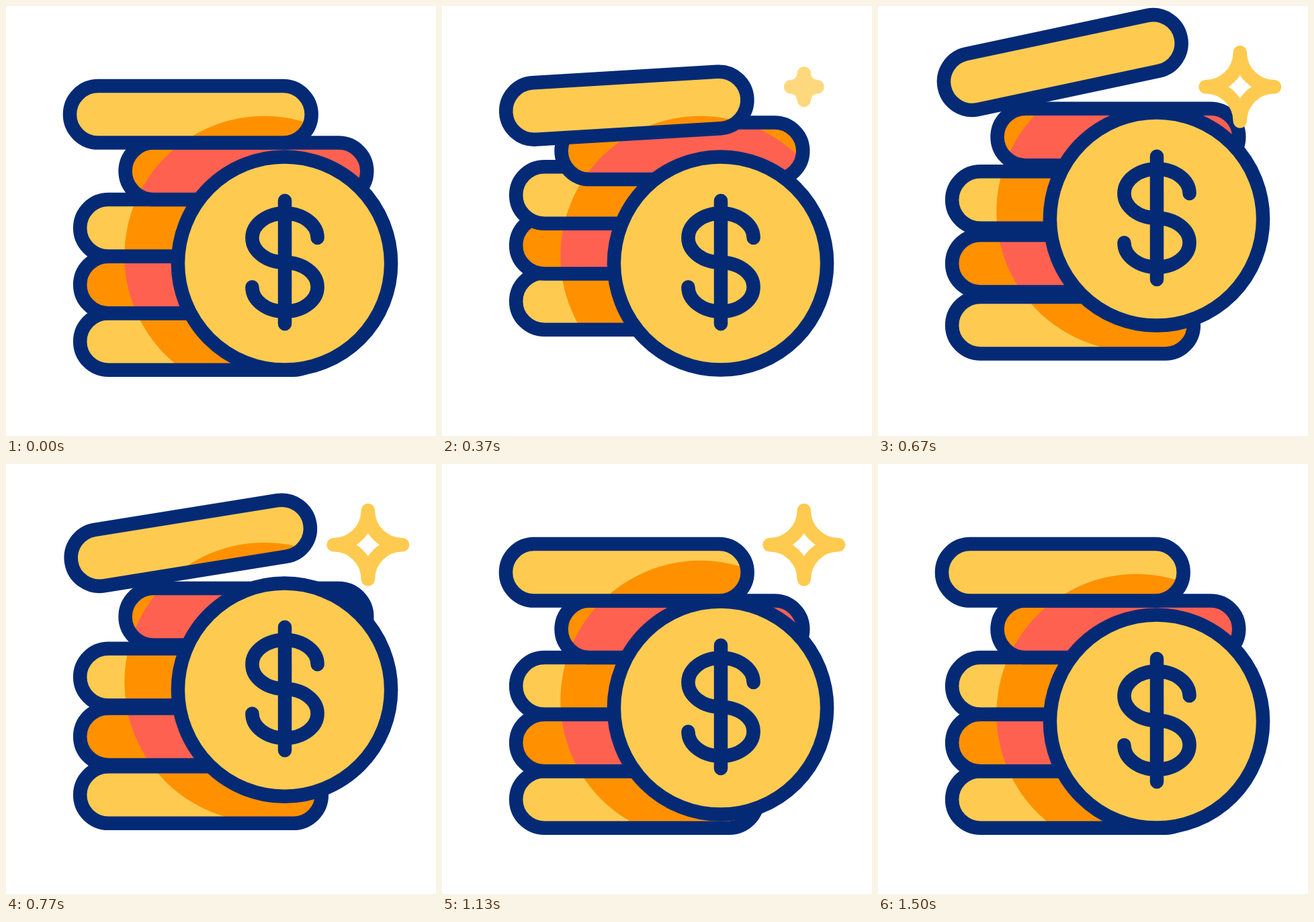
These frames come from a looping animation (640 px wide and 640 px high, 2 s). An HTML page with a canvas:

```html
<!DOCTYPE html>
<html lang="en">
<head>
<meta charset="utf-8">
<title>Coins</title>
<style>
  html, body { margin: 0; width: 100%; height: 100%; overflow: hidden; background: #fff; }
  canvas { display: block; width: 100vmin; height: 100vmin; }
</style>
</head>
<body>
<canvas width="640" height="640"></canvas>
<script>
const ctx = document.querySelector('canvas').getContext('2d');
const LOOP = 2000, STEP = 1000 / 30, LINE = 20.5;
const NAVY = '#042a76', YELLOW = '#fecb50', ORANGE = '#ff9100', RED = '#ff6151';
const BAR_RADIUS = 42.25, BAR_HALF = 137.6;

// Key times are in steps of 1/30 s.
const BARS = [
  { x: 290, y: 499.4, fill: YELLOW, shade: ORANGE, rise: [[0, 0], [10, 60], [12, 60], [26.4, 0]] },
  { x: 290, y: 414.9, fill: ORANGE, shade: RED, rise: [[2, 0], [12, 60], [14, 60], [26.4, 0]] },
  { x: 290, y: 330.3, fill: YELLOW, shade: ORANGE, rise: [[4, 0], [14, 60], [16, 60], [26.4, 0]] },
  { x: 357.4, y: 245.8, fill: ORANGE, shade: RED, rise: [[6, 0], [16, 60], [17.6, 60], [26.4, 0]] },
  { x: 274.8, y: 161.3, fill: YELLOW, shade: ORANGE,
    rise: [[8.6, 0], [17, 78], [19.5, 78], [27, 0]],
    tiltUp: [[7.4, 0], [20, 12]], tiltDown: [[20, 12], [28.8, 0]] }
];
const COIN_RISE = [[12, 0], [20, 66], [28, 0], [34, 20], [40, 0]];
const STAR_SIZE = [[8, 0], [16, 68], [20, 51.3], [34, 51.3], [38, 68], [45, 0]];
const STAR_ALPHA = [[8, 0], [12, 1], [41, 1], [45, 0]];

const linear = x => x;
const easeInOut = x => x ** 1.75 / (x ** 1.75 + (1 - x) ** 1.75);

function track(keys, time, ease = easeInOut) {
  if (time <= keys[0][0]) return keys[0][1];
  for (let i = 1; i < keys.length; i++) {
    const [t0, v0] = keys[i - 1], [t1, v1] = keys[i];
    if (time < t1) return v0 + (v1 - v0) * ease((time - t0) / (t1 - t0));
  }
  return keys[keys.length - 1][1];
}

function fillCircle(x, y, r, color) {
  ctx.fillStyle = color;
  ctx.beginPath();
  ctx.arc(x, y, r, 0, Math.PI * 2);
  ctx.fill();
}

function barTilt(bar, time) {
  if (!bar.tiltUp) return 0;
  const degrees = time < 20 ? track(bar.tiltUp, time, linear) : track(bar.tiltDown, time);
  return -degrees * Math.PI / 180;
}

function drawBar(bar, time, coinRise) {
  const y = bar.y - track(bar.rise, time);
  const angle = barTilt(bar, time), quarter = Math.PI / 2;
  const dx = BAR_HALF * Math.cos(angle), dy = BAR_HALF * Math.sin(angle);
  const path = new Path2D();
  path.arc(bar.x + dx, y + dy, BAR_RADIUS, angle - quarter, angle + quarter);
  path.arc(bar.x - dx, y - dy, BAR_RADIUS, angle + quarter, angle + 3 * quarter);
  path.closePath();

  ctx.fillStyle = bar.fill;
  ctx.fill(path);
  ctx.save();
  ctx.clip(path);
  fillCircle(384.5, 372 - coinRise, 208.2, bar.shade);
  ctx.restore();
  ctx.strokeStyle = NAVY;
  ctx.stroke(path);
}

function drawCoin(rise) {
  ctx.save();
  ctx.translate(414.5, 383 - rise);
  fillCircle(0, 0, 158.6, YELLOW);
  ctx.strokeStyle = NAVY;
  ctx.stroke();

  ctx.translate(0.5, -1.3);
  ctx.beginPath();
  ctx.moveTo(0, -92);
  ctx.lineTo(0, 91.3);
  ctx.moveTo(48.6, -36.6);
  ctx.ellipse(0, -36.6, 48.6, 36.6, 0, 0, Math.PI / 2, true);
  ctx.ellipse(0, 36.6, 48.6, 36.6, 0, -Math.PI / 2, Math.PI);
  ctx.stroke();
  ctx.restore();
}

function drawStar(time) {
  const size = track(STAR_SIZE, time), alpha = track(STAR_ALPHA, time, linear);
  if (size <= 0 || alpha <= 0) return;
  ctx.save();
  ctx.globalAlpha = alpha;
  ctx.translate(538.8, 120.2);
  ctx.strokeStyle = YELLOW;
  ctx.beginPath();
  ctx.moveTo(0, -size);
  ctx.arc(size, -size, size, Math.PI, Math.PI / 2, true);
  ctx.arc(size, size, size, -Math.PI / 2, Math.PI, true);
  ctx.arc(-size, size, size, 0, -Math.PI / 2, true);
  ctx.arc(-size, -size, size, Math.PI / 2, 0, true);
  ctx.closePath();
  ctx.stroke();
  ctx.restore();
}

function draw(time) {
  ctx.fillStyle = '#fff';
  ctx.fillRect(0, 0, 640, 640);
  ctx.lineWidth = LINE;
  ctx.lineCap = ctx.lineJoin = 'round';
  const coinRise = track(COIN_RISE, time);
  for (const bar of BARS) drawBar(bar, time, coinRise);
  drawCoin(coinRise);
  drawStar(time);
}

const start = performance.now();
function tick() {
  const elapsed = (performance.now() - start) % LOOP;
  draw(Math.floor((elapsed + 3.5) / STEP) % 60);
  requestAnimationFrame(tick);
}
tick();
</script>
</body>
</html>
```
